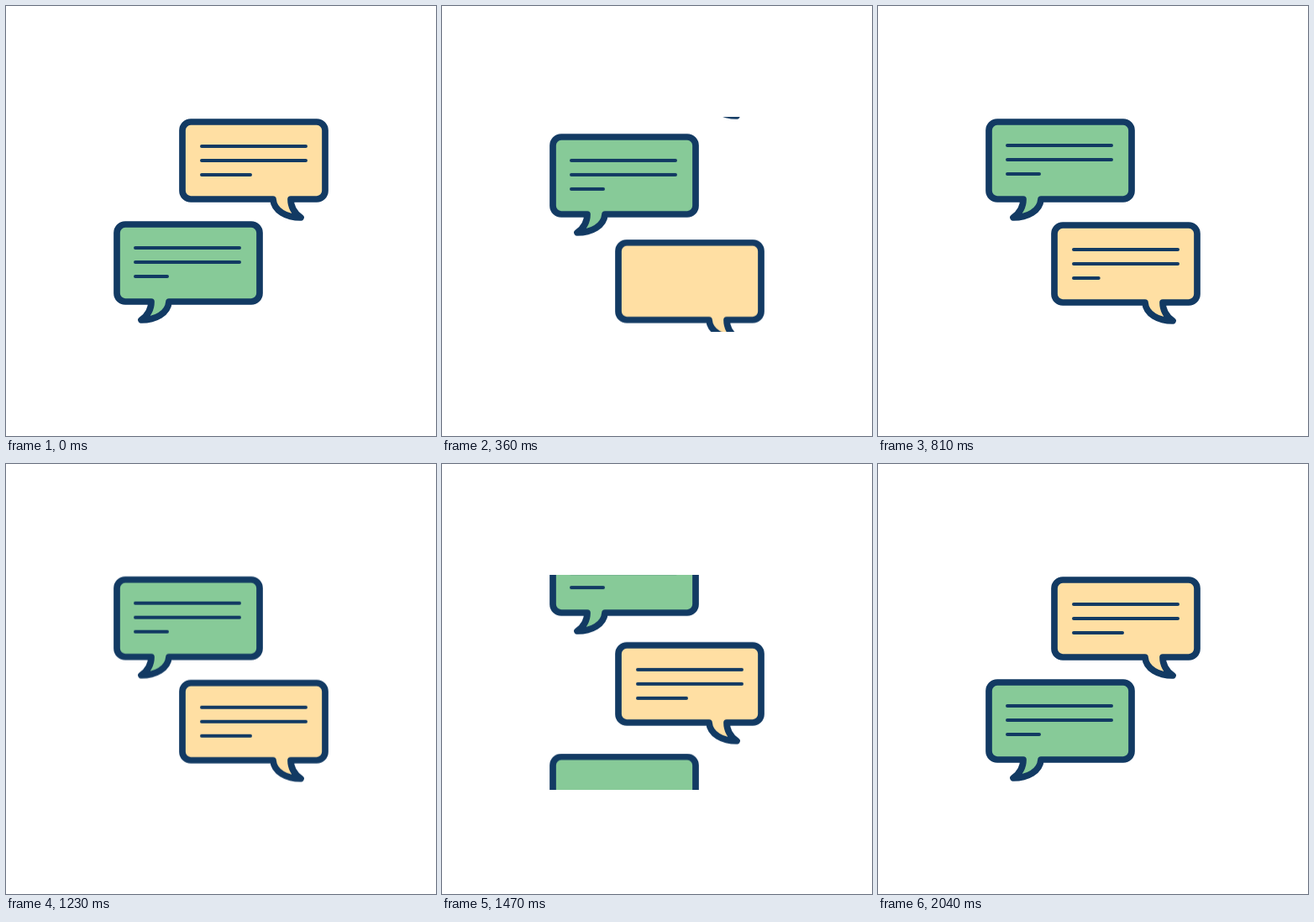
Write an HTML page without scripts that moves like this. It is 512 px wide and 512 px high and loops after 2430 ms.

```html
<!DOCTYPE html>
<html lang="en">
<head>
<meta charset="utf-8">
<title>Chat bubbles</title>
<style>
  html, body { margin: 0; width: 100%; height: 100%; overflow: hidden; background: #fff; }
  svg { display: block; width: 100%; height: 100%; }

  .body { stroke-width: 7.7; }
  .text { stroke-width: 4; }
  .sand { fill: #ffdfa3; }
  .mint { fill: #87ca98; }

  /* Bubbles scroll up in two moves: 0–540 ms and 1200–1800 ms */
  .move { animation: 2430ms cubic-bezier(.65, 0, .35, 1) infinite; }
  .sand-out { animation-name: sand-out; }
  .sand-in { animation-name: sand-in; }
  .mint-out { animation-name: mint-out; }
  .mint-in { animation-name: mint-in; }

  @keyframes sand-out {
    0% { transform: translateY(0); }
    22.222%, 100% { transform: translateY(-142px); }
  }
  @keyframes sand-in {
    0% { transform: translateY(264px); }
    22.222%, 49.383% { transform: translateY(123px); }
    74.074%, 100% { transform: translateY(0); }
  }
  @keyframes mint-out {
    0% { transform: translateY(0); }
    22.222%, 49.383% { transform: translateY(-122px); }
    74.074%, 100% { transform: translateY(-266px); }
  }
  @keyframes mint-in {
    0%, 49.383% { transform: translateY(140px); }
    74.074%, 100% { transform: translateY(0); }
  }

  /* Text lines are written one after another */
  .type path {
    stroke-dasharray: 1 3;
    animation: 2430ms linear var(--wait, 0ms) infinite backwards;
  }
  .type path:nth-child(1) { animation-name: line1; }
  .type path:nth-child(2) { animation-name: line2; }
  .type path:nth-child(3) { animation-name: line3; }
  .late { --wait: 1200ms; }

  @keyframes line1 {
    0%, 17.284% { stroke-dashoffset: 1.01; }
    24.691%, 100% { stroke-dashoffset: 0; }
  }
  @keyframes line2 {
    0%, 24.691% { stroke-dashoffset: 1.01; }
    32.099%, 100% { stroke-dashoffset: 0; }
  }
  @keyframes line3 {
    0%, 32.099% { stroke-dashoffset: 1.01; }
    34.568%, 100% { stroke-dashoffset: 0; }
  }
</style>
</head>
<body>
<svg viewBox="0 0 512 512">
  <defs>
    <clipPath id="view"><rect x="128" y="132" width="256" height="256"/></clipPath>
    <path id="bubble" class="body" d="M318 230H220a10 10 0 0 1-10-10V148a10 10 0 0 1 10-10H370a10 10 0 0 1 10 10V220a10 10 0 0 1-10 10H339C339 239 344 247 351 252C334 252 319 244 318 230Z"/>
    <use id="flipped" href="#bubble" transform="translate(512 122) scale(-1 1)"/>
  </defs>
  <g clip-path="url(#view)" fill="none" stroke="#123a63" stroke-linecap="round" stroke-linejoin="round">
    <g class="move sand-out">
      <use href="#bubble" class="sand"/>
      <path class="text" d="M233 167h124M233 184h124M233 201h58"/>
    </g>
    <g class="move sand-in">
      <use href="#bubble" class="sand"/>
      <g class="text type">
        <path pathLength="1" d="M233 167h124"/>
        <path pathLength="1" d="M233 184h124"/>
        <path pathLength="1" d="M233 201h58"/>
      </g>
    </g>
    <g class="move mint-out">
      <use href="#flipped" class="mint"/>
      <path class="text" d="M154 288h124M154 305h124M154 322h38"/>
    </g>
    <g class="move mint-in">
      <use href="#flipped" class="mint"/>
      <g class="text type late">
        <path pathLength="1" d="M154 288h124"/>
        <path pathLength="1" d="M154 305h124"/>
        <path pathLength="1" d="M154 322h38"/>
      </g>
    </g>
  </g>
</svg>
</body>
</html>
```
